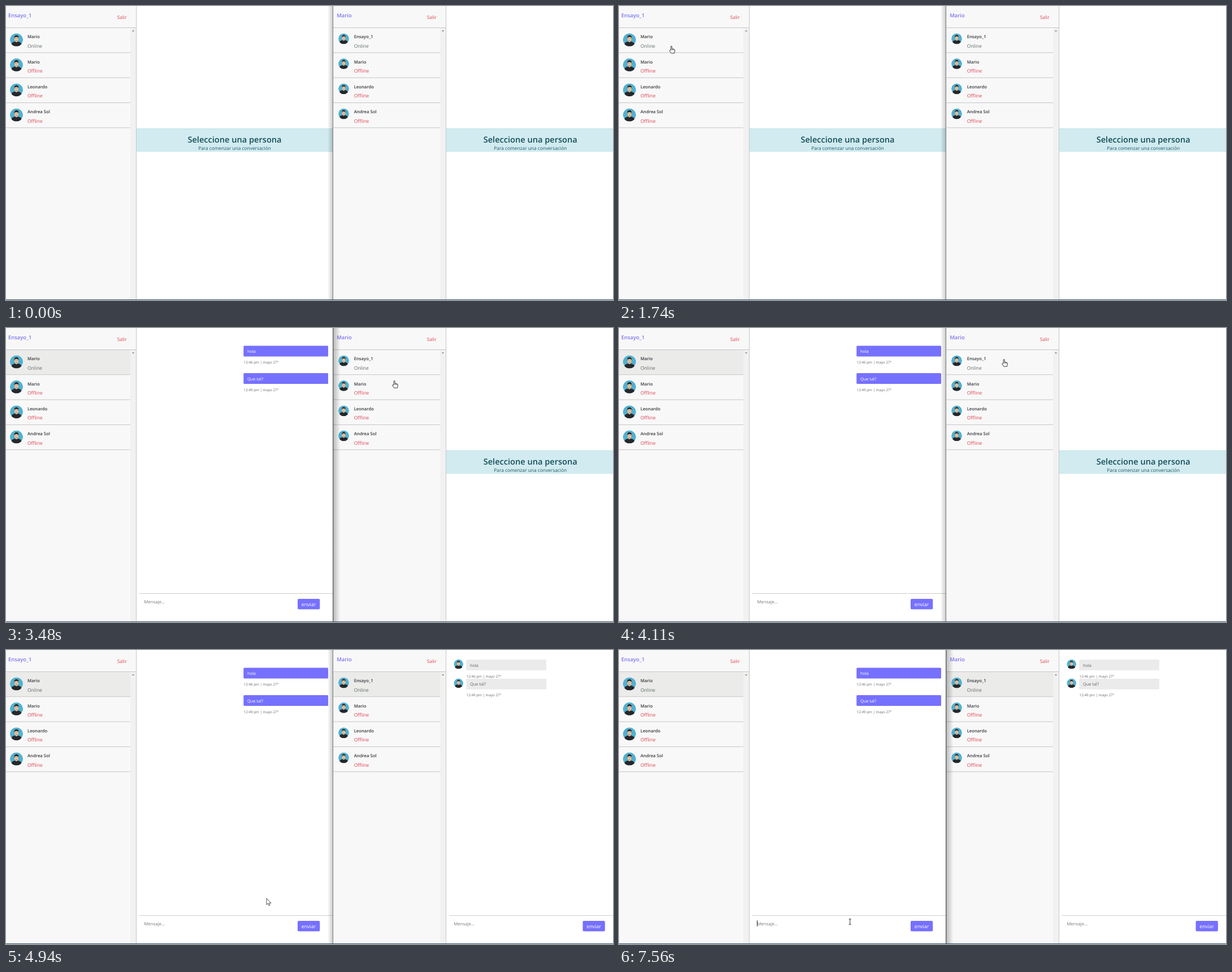
An HTML page for the animation above (8 s loop, 1074x521 px).

```html
<!DOCTYPE html>
<html lang="es">
<head>
<meta charset="utf-8">
<style>
html, body { margin: 0; width: 100%; height: 100%; overflow: hidden; background: #fff; }
svg { display: block; width: 1074px; height: 521px; }
text { font-family: "Open Sans", "Noto Sans", sans-serif; text-rendering: geometricPrecision; }
</style>
</head>
<body>
<svg id="stage" viewBox="0 0 1074 521"></svg>
<script>
const LOOP = 8000, PITCH = 44.35, VIOLET = '#7670ff', RULE = '#c6c6c6';
const stage = document.getElementById('stage');

const rect = (x, y, w, h, fill, more = '') =>
  `<rect x="${x}" y="${y}" width="${w}" height="${h}" fill="${fill}" ${more}/>`;
const text = (x, y, size, fill, str, more = '') =>
  `<text x="${x}" y="${y}" font-size="${size}" fill="${fill}" ${more}>${str}</text>`;
const group = (id, body) => `<g id="${id}">${body}</g>`;
const avatar = (x, y, r) =>
  `<use href="#avatar" x="${x - r}" y="${y - r}" width="${2 * r}" height="${2 * r}"/>`;

const defs = `<defs>
  <symbol id="avatar" viewBox="-12 -12 24 24">
    <clipPath id="disc"><circle r="12"/></clipPath>
    <g clip-path="url(#disc)">
      <circle r="12" fill="#52b1d0"/>
      <path d="M-9 12V7.5Q-8.500 4-3 3H3Q8.500 4 9 7.500V12z" fill="#25272b"/>
      <path d="M-2.200 0H2.200V3.400Q0 5.600-2.200 3.400z" fill="#dfa982"/>
      <ellipse cy="-2.200" rx="3.700" ry="4.900" fill="#f2c6a0"/>
      <path d="M-4.100-2Q-5-8.400 0-8.600 5-8.400 4.100-2L3.300-4.800Q0-6-3.300-4.800z" fill="#25211f"/>
      <path d="M-2.600-3.100h1.800M.8-3.100h1.800M-1.200.8h2.400" stroke="#5a3a2c" stroke-width=".7"/>
    </g>
  </symbol>
  <linearGradient id="toLeft"><stop stop-opacity="0"/><stop offset="1" stop-opacity=".2"/></linearGradient>
  <linearGradient id="toRight"><stop stop-opacity=".24"/><stop offset="1" stop-opacity="0"/></linearGradient>
</defs>`;

function sidebar(id, x, w, nameX, owner, textX, face, people) {
  let out = rect(x, 0, w, 521, '#f8f8f8') + rect(x + w - 10, 39, 10, 482, '#f1f1f1') +
    group(id + 'Pick', rect(x, 39, w - 10, 43.5, '#ebebea')) +
    rect(x, 38, w, 1, RULE) + rect(x + w, 0, 1, 521, RULE) +
    `<path d="M${x + w - 7.2} 45h4.400l-2.200-2.400z" fill="#8a8a8a"/>` +
    text(nameX, 19.6, 9.4, '#7b76f2', owner, 'font-weight="600"') +
    text(x + w - 33.3, 22.6, 8.4, '#dc4250', 'Salir');
  people.forEach((name, i) => {
    const y = i * PITCH;
    out += avatar(face.x, face.y + y, face.r) +
      text(textX, 57.3 + y, 7.7, '#33373b', name, 'font-weight="600"') +
      text(textX, 73.6 + y, 8.5, i ? '#dc4250' : '#5d6a66', i ? 'Offline' : 'Online') +
      rect(x, 82.2 + y, w - 10, 1, RULE);
  });
  return out;
}

const banner = (id, x, w, mid) => group(id,
  rect(x, 217, w, 41.5, '#d1ebf0') + rect(x, 217, w, 1, '#bfdfe5') +
  text(mid, 242.2, 14.6, '#144d58', 'Seleccione una persona', 'font-weight="600" text-anchor="middle"') +
  text(mid, 255.2, 8.35, '#215862', 'Para comenzar una conversación', 'text-anchor="middle"'));

const composer = (id, x, w, button) => group(id,
  rect(x, 470, w, 1, '#cccccc') + text(x + 8.3, 487.6, 7.8, '#74797e', 'Mensaje...') +
  rect(button, 480, 39.3, 18.5, VIOLET, 'rx="2"') + text(button + 6.7, 492.8, 8.9, '#fff', 'enviar'));

const message = (x, y, w, fill, ink, str, time) =>
  rect(x, y, w, 19, fill, 'rx="1.5"') + text(x + 6.7, y + 12.6, 7.4, ink, str) +
  text(x + .3, y + 31.6, 6.28, '#666', time + ' pm | mayo 27º');

const talk = [['hola', '12:46'], ['Que tal?', '12:49']];
const sent = talk.map((m, i) => message(420.3, 31.5 + i * 48.4, 149.7, VIOLET, '#fff', ...m)).join('');
const received = talk.map((m, i) =>
  avatar(800.7, 25.2 + i * 33.7, 8.4) + message(814.3, 17 + i * 33.7, 141.7, '#ebebeb', '#646464', ...m)).join('');

const pointers =
  group('hand', `<path d="M-2.300 1V-5.500a1 1 0 0 1 2 0V-1.600L3.500-.9Q4.900-.5 4.800 1L4 6.200H-1.700L-4.500 2.200Q-5 .8-3.700.6z"
    fill="#fff" stroke="#222" stroke-width=".9" stroke-linejoin="round"/>
    <path d="M-.3-1.600V1M1.400-1.200V1M3-.9V1" stroke="#222" stroke-width=".6"/>`) +
  group('arrow', `<path d="M-4-6.500V4.600L-1.500 2.300.2 6.200 2 5.400.4 1.700H3.900z" fill="#fff" stroke="#222" stroke-width=".8"/>`) +
  group('beam', `<path d="M-2-4.700H2M-2 4.700H2M0-4.700V4.700" stroke="#333" stroke-width="1"/>`);

stage.innerHTML = defs +
  sidebar('left', 0, 230, 4, 'Ensayo_1', 38, { x: 18.5, y: 60, r: 11.5 }, ['Mario', 'Mario', 'Leonardo', 'Andrea Sol']) +
  banner('leftBanner', 231, 347, 404.5) +
  group('leftChat', composer('leftBox', 236, 342, 516) + sent) +
  sidebar('right', 579, 199, 585.2, 'Mario', 615.7, { x: 597.5, y: 58, r: 9.5 }, ['Ensayo_1', 'Mario', 'Leonardo', 'Andrea Sol']) +
  banner('rightBanner', 779, 295, 927.7) +
  composer('rightChat', 784, 290, 1020.5) + group('rightTalk', received) +
  group('leftFront', rect(579.5, 0, 12, 521, 'url(#toRight)') + rect(578, 0, 1.5, 521, '#5c5c5c')) +
  group('rightFront', rect(569, 0, 9, 521, 'url(#toLeft)') + rect(578, 0, 1, 521, '#777')) +
  rect(0, 520, 1074, 1, '#34506c') +
  group('caret', rect(244, 479, 1, 11, '#333')) +
  group('cursor', pointers);

// Pointer path: time, x, y
const path = [
  [580, 908, 502], [750, 680, 420], [1000, 310, 250], [1200, 155, 165], [1320, 128, 142],
  [1400, 112, 118], [1550, 84, 90], [1740, 94, 77.500], [1810, 94, 77.500], [2010, 94, 69],
  [3000, 94, 69], [3070, 130, 85], [3140, 300, 150], [3210, 560, 212], [3280, 750, 226],
  [3340, 814, 190], [3410, 740, 130], [3480, 688.500, 100], [3550, 687, 96], [3760, 682.500, 62],
  [4310, 682.500, 62], [4500, 640, 170], [4750, 540, 360], [5010, 438, 478], [5150, 408.700, 481.500]
];
const blinks = [5420, 5950, 6480, 7030, 7560];

function pointerAt(t) {
  const i = path.findIndex(p => p[0] > t);
  if (i < 0) return path[path.length - 1].slice(1);
  if (i === 0) return path[0].slice(1);
  const [a, b] = [path[i - 1], path[i]], k = (t - a[0]) / (b[0] - a[0]);
  return [1, 2].map(n => a[n] + (b[n] - a[n]) * k);
}

const show = (id, on) => { document.getElementById(id).style.display = on ? '' : 'none'; };

function draw(now) {
  const t = now % LOOP;
  const leftOpen = t >= 2880, rightOpen = t >= 4250;
  const leftFront = (t >= 2600 && t < 4110) || t >= 5420;
  show('leftPick', leftOpen);
  show('leftChat', leftOpen);
  show('leftBanner', !leftOpen);
  show('rightPick', rightOpen);
  show('rightChat', rightOpen);
  show('rightBanner', !rightOpen);
  show('rightTalk', t >= 4320);
  show('leftFront', leftFront);
  show('rightFront', !leftFront);
  show('caret', blinks.filter(b => t >= b).length % 2);

  const [x, y] = pointerAt(t);
  const overRow = y > 39 && y < 216 && (x < 220 || (x > 579 && x < 768));
  const overInput = y > 470 && x > 236 && x < 510;
  show('cursor', t >= 580);
  show('hand', overRow);
  show('beam', overInput);
  show('arrow', !overRow && !overInput);
  document.getElementById('cursor').setAttribute('transform', `translate(${x} ${y})`);
  requestAnimationFrame(draw);
}
draw(performance.now());
</script>
</body>
</html>
```
